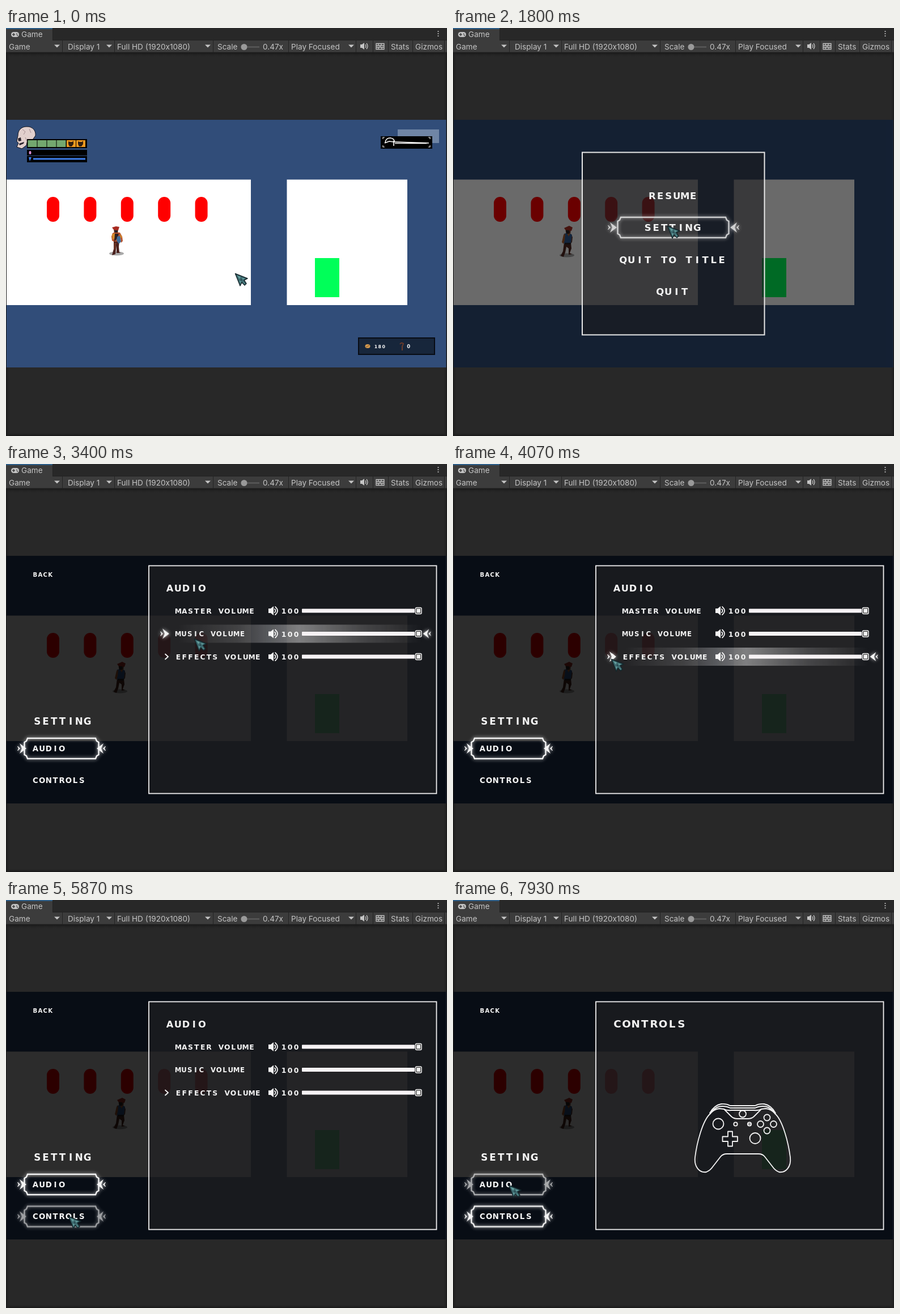
Animation of 778 by 720 pixels, one loop 8 s. Source, as an HTML page:

```html
<!DOCTYPE html>
<html lang="en">
<head>
<meta charset="utf-8">
<title>Game pause menu</title>
<style>
html, body { margin: 0; width: 100%; height: 100%; overflow: hidden; background: #282828; }
svg { display: block; width: 778px; height: 720px; }
.ui { font: 13.6px Inter, sans-serif; fill: #c4c4c4; }
.px { font-family: "DejaVu Sans", sans-serif; font-weight: bold; fill: #f4f4f4; text-anchor: middle; }
.line { fill: none; stroke: #f4f4f4; stroke-width: 1.8; stroke-linejoin: round; stroke-linecap: round; }
.glow { filter: drop-shadow(0 0 3px #fffc); }
.frame { fill: none; stroke: #f4f4f4; stroke-width: 2.4; }
.anim { animation: 8s linear infinite; }

#cursor { animation-name: cursor; }
#hud { animation-name: hud; }
#dim { animation-name: dim; }
#menu { animation-name: menu; }
#settings { animation-name: settings; }
#menuHover { animation-name: menuHover; }
#audioTab { animation-name: audioTab; }
#controlsTab { animation-name: controlsTab; }
#audioPanel { animation-name: audioPanel; }
#controlsPanel { animation-name: controlsPanel; }
#musicHover { animation-name: musicHover; }
#effectsHover { animation-name: effectsHover; }
#idle { animation-name: idle; }
#walk { animation-name: walk; }

@keyframes cursor {
  0%, .9% { transform: translate(404px, 433px); }
  10.9% { transform: translate(384px, 344px); }
  18.4%, 25% { transform: translate(378px, 349px); }
  28.7% { transform: translate(150px, 470px); }
  30.8%, 31.5% { transform: translate(122px, 502px); }
  32.7% { transform: translate(112px, 545px); }
  34.2% { transform: translate(150px, 550px); }
  35.9%, 36.3% { transform: translate(240px, 516px); }
  39.1% { transform: translate(330px, 400px); }
  41.6% { transform: translate(350px, 300px); }
  44.1% { transform: translate(300px, 322px); }
  46.6%, 47.5% { transform: translate(272px, 340px); }
  50%, 51.7% { transform: translate(279px, 344px); }
  53.8% { transform: translate(290px, 338px); }
  55.9%, 58.1% { transform: translate(275px, 342px); }
  60%, 64% { transform: translate(711px, 527px); }
  64.1%, 64.9% { transform: translate(285px, 344px); }
  65%, 67.3% { transform: translate(281px, 346px); }
  71.2% { transform: translate(150px, 520px); }
  73.1%, 75.4% { transform: translate(110px, 558px); }
  77.5% { transform: translate(267px, 536px); }
  79.1% { transform: translate(480px, 500px); }
  80.9% { transform: translate(715px, 400px); }
  82.5% { transform: translate(560px, 256px); }
  84.1%, 88.3% { transform: translate(380px, 336px); }
  90%, 92.3% { transform: translate(370px, 355px); }
  95% { transform: translate(210px, 440px); }
  97.5% { transform: translate(110px, 497px); }
  99.1%, 100% { transform: translate(98px, 503px); }
}
@keyframes hud { 0%, 11.5% { opacity: 1; } 14%, 100% { opacity: 0; } }
@keyframes dim { 0%, 11.5% { opacity: 0; } 15%, 22.9% { opacity: .583; } 24.1%, 100% { opacity: .826; } }
@keyframes menu { 0%, 11.5% { opacity: 0; } 15%, 22.9% { opacity: 1; } 24%, 100% { opacity: 0; } }
@keyframes settings { 0%, 22.9% { opacity: 0; } 24.1%, 100% { opacity: 1; } }
@keyframes menuHover { 0%, 16.5% { opacity: 0; } 18.4%, 100% { opacity: .82; } }
@keyframes audioTab { 0%, 73.7% { opacity: 1; } 73.8%, 97.4% { opacity: 0; } 99.1%, 100% { opacity: .68; } }
@keyframes controlsTab {
  0%, 32% { opacity: 0; } 33%, 34.5% { opacity: .65; } 35.9%, 72.3% { opacity: 0; }
  73.4% { opacity: .65; } 73.8%, 100% { opacity: 1; }
}
@keyframes audioPanel { 0%, 73.7% { opacity: 1; } 73.8%, 100% { opacity: 0; } }
@keyframes controlsPanel { 0%, 73.7% { opacity: 0; } 73.8%, 100% { opacity: 1; } }
@keyframes musicHover { 0%, 40.5% { opacity: 0; } 41.3%, 42.8% { opacity: 1; } 43.9%, 100% { opacity: 0; } }
@keyframes effectsHover {
  0%, 24.1% { opacity: 0; } 25%, 25.9% { opacity: 1; } 27.5%, 43.4% { opacity: 0; }
  44.5%, 67.3% { opacity: 1; } 68.6%, 100% { opacity: 0; }
}
@keyframes idle { 0%, 5% { opacity: 1; } 5.01%, 100% { opacity: 0; } }
@keyframes walk {
  0%, 5% { opacity: 0; transform: translateX(-5px); }
  5.01% { opacity: 1; transform: translateX(-5px); }
  10.9%, 100% { opacity: 1; transform: none; }
}
</style>
</head>
<body>
<svg viewBox="0 0 778 720">
  <defs>
    <linearGradient id="sheen">
      <stop offset="0" stop-color="#fff" stop-opacity="0"/>
      <stop offset=".25" stop-color="#fff" stop-opacity=".14"/>
      <stop offset=".5" stop-color="#fff" stop-opacity=".42"/>
      <stop offset=".75" stop-color="#fff" stop-opacity=".16"/>
      <stop offset="1" stop-color="#fff" stop-opacity="0"/>
    </linearGradient>
    <linearGradient id="shadeY" x2="0" y2="1">
      <stop offset="0" stop-color="#171717"/>
      <stop offset="1" stop-color="#282828" stop-opacity="0"/>
    </linearGradient>
    <linearGradient id="shadeX">
      <stop offset="0" stop-color="#1b1b1b"/>
      <stop offset="1" stop-color="#282828" stop-opacity="0"/>
    </linearGradient>
    <path id="dart" fill="#f4f4f4" d="M3-9 15 0 3 9 7 0ZM-1-4 0-4 4 0 0 4-1 4 1 0Z"/>
    <path id="caret" fill="#c4c4c4" d="M-5-2.5H5L0 2.5Z"/>
    <g id="tab" class="glow">
      <path class="frame" d="M38 484H158L160 489 163.500 491V513L160 515 158 520H38L36 515 32.500 513V491L36 489Z"/>
      <use href="#dart" x="21" y="502"/>
      <use href="#dart" transform="translate(175 502) scale(-1 1)"/>
    </g>
    <g id="rowHover">
      <rect x="300" y="-16" width="435" height="32" fill="url(#sheen)"/>
      <g class="glow">
        <use href="#dart" x="273"/>
        <use href="#dart" transform="translate(749 0) scale(-.9 .9)"/>
      </g>
    </g>
    <g id="speaker">
      <path fill="#f4f4f4" d="M463-4H467L472-8V8L467 4H463Z"/>
      <path class="line" d="M474-3Q477 0 474 3M475-7Q483 0 475 7"/>
    </g>
    <g id="slider">
      <use href="#speaker"/>
      <rect x="522" y="-3.500" width="199" height="7" rx="1" fill="#f6f2f4"/>
      <rect x="722.500" y="-5.500" width="10.500" height="11" rx="2" fill="#303030" stroke="#f4f4f4" stroke-width="1.500"/>
      <rect x="724.500" y="-3.500" width="6.500" height="7" fill="#f4f4f4"/>
    </g>
    <g id="halfPad" class="line">
      <path d="M-57 17C-71 29-81 70-84 94-86 111-76 122-64 120Q-57 117-53 111L-39 93Q-35 88-28 88H0"/>
      <path d="M-57 17Q-51 9-41 8L-33 9-20 22Q-16 26-9 26H0M-33 9Q-28 12-20 11H0"/>
      <path d="M-58 16Q-50 2-38 0-29-1-22 3H0M-54 13Q-47 4-36 4-28 4-22 7H0"/>
    </g>
  </defs>

  <rect width="778" height="720" fill="#282828"/>
  <g id="viewShade">
    <rect y="43" width="778" height="9" fill="url(#shadeY)"/>
    <rect width="778" height="7" fill="url(#shadeY)" transform="matrix(1 0 0 -1 0 720)"/>
    <rect y="43" width="7" height="677" fill="url(#shadeX)"/>
    <rect width="7" height="677" fill="url(#shadeX)" transform="matrix(-1 0 0 1 778 43)"/>
  </g>

  <g id="toolbar" class="ui">
    <path fill="#3c3c3c" d="M0 1H82V22H778V43H0Z"/>
    <path fill="#2c5d87" d="M0 0H82V2H0Z"/>
    <path stroke="#232323" d="M82.500 2V22M82 21.500H778M0 43H778M99.500 22V43M191.500 22V43M365.500 22V43M498.500 22V43M617.500 22V43M647.500 22V43M674.500 22V43M717.500 22V43M773.500 22V43"/>
    <rect x="9" y="7" width="14" height="9" rx="4.500"/>
    <path stroke="#3c3c3c" stroke-width="1.500" d="M11 11.500H16M13.500 9V14M18 10.500H20M19 13H21"/>
    <path stroke="#c4c4c4" stroke-width="2.200" stroke-linecap="round" stroke-dasharray="0 4" d="M762.500 6V15"/>
    <text x="27" y="16">Game</text>
    <text x="5" y="37.500">Game</text>
    <text x="109" y="37.500">Display 1</text>
    <text x="196" y="37.500">Full HD (1920x1080)</text>
    <text x="373" y="38">Scale</text>
    <text x="453" y="38">0.47x</text>
    <text x="503" y="37.500">Play Focused</text>
    <text x="679" y="37.500">Stats</text>
    <text x="722" y="37.500">Gizmos</text>
    <use href="#caret" x="90" y="32"/><use href="#caret" x="182" y="32"/>
    <use href="#caret" x="356" y="32"/><use href="#caret" x="609" y="32"/>
    <path stroke="#5e5e5e" stroke-width="2" d="M420 33.500H447"/>
    <circle cx="420" cy="33.500" r="5.500" fill="#999"/>
    <path d="M625 29H628L632 26V38L628 35H625Z"/>
    <path fill="none" stroke="#c4c4c4" stroke-width="1.300" d="M634 29Q636 32 634 35M636 27Q640 32 636 37M653 27.500H667V37.500H653ZM653 31H667M653 34H667M657 28V31M662 28V31M660 31V34M657 34V37M663 34V37"/>
  </g>

  <g id="scene">
    <rect x="1" y="162" width="775.500" height="437" fill="#314d79"/>
    <path fill="#fff" d="M1 267.500H432V489H1ZM495.500 267.500H708V489H495.500Z"/>
    <path fill="#00ff59" d="M545 406H588V475H545Z"/>
    <g id="pills" fill="red"></g>

    <g id="idle" class="anim">
      <ellipse cx="195" cy="398" rx="13" ry="3.500" fill="#aaa"/>
      <path fill="#4a211d" d="M190 377H200L199 386 200 396 203 397H195L195 384 193 399 187 401 190 390Z"/>
      <path fill="#6d3425" d="M191 379H195L192 392 190 391ZM190 355H198L197 363H191Z"/>
      <path fill="#b5502a" d="M188 362 193 360 201 361 205 368 206 376 203 379 202 370 200 377H190L187 375 186 368Z"/>
      <path fill="#d58b2b" d="M187 364 192 362 194 369 188 374ZM201 363 205 369 202 371Z"/>
      <path fill="#2c2022" d="M192 363H199L197 370 191 377ZM191 357H197V361H192Z"/>
      <path fill="#3e6b98" d="M196 368 201 367 203 377 199 381 195 375Z"/>
      <path fill="#a82a20" d="M187 352 194 350 200 351 198 357 190 356Z"/>
    </g>
    <g id="walk" class="anim">
      <ellipse cx="201" cy="401" rx="13" ry="3.500" fill="#aaa"/>
      <path fill="#50261f" d="M196 379H208L209 389 206 397 210 399 204 400 204 389 200 386 198 396 195 404 190 402 194 394Z"/>
      <path fill="#6b3826" d="M198 354H208L207 364H200ZM208 363 211 369 210 378 207 381Z"/>
      <path fill="#2f5990" d="M196 363 204 361 210 365 208 381 196 381 194 372Z"/>
      <path fill="#ad5f2c" d="M195 365 198 363 197 374 195 381 192 378ZM201 362H207L204 368Z"/>
      <path fill="#292225" d="M199 357H205V363H200ZM197 379H208V382H197Z"/>
      <path fill="#a62e22" d="M196 353 205 349 211 352 209 358 198 356Z"/>
    </g>
  </g>

  <g id="hud" class="anim">
    <path fill="#e2d0cd" stroke="#15151c" d="M21 190C21 179 28 174 37 174 47 174 53 181 52 190L47 197 38 198 36 207 28 213 19 210 22 203 19 200Z"/>
    <path fill="#28222a" d="M21 195 26 193 27 199 22 200ZM23 204 32 201 31 204 24 207Z"/>
    <path fill="none" stroke="#a58f92" d="M29 179 34 183 31 188M41 178 44 185M34 193 38 202"/>
    <path d="M37 196H143V212H37ZM37 215H143V225H37ZM37 226H143V237H37Z"/>
    <path stroke="#73a86f" stroke-width="12" stroke-dasharray="16 1" d="M38.500 204H106"/>
    <path stroke="#f39a1f" stroke-width="12" stroke-dasharray="16 1" d="M107 204H141"/>
    <path id="faces" fill="#332011" d="M110 200 113 201 117 201 119 199V205L116 209H112L110 205ZM127 200 130 201 134 201 136 199V205L133 209H129L127 205Z"/>
    <ellipse cx="42.500" cy="220" rx="2" ry="3" fill="#d88bd2"/>
    <path fill="#3f80ee" d="M40 228H45L42 235ZM48 229.500H140V232.500H48Z"/>
    <rect x="691" y="179" width="73" height="24" fill="#6f85a5"/>
    <rect x="661" y="191" width="91" height="22"/>
    <path fill="none" stroke="#eee" stroke-width="1.200" d="M665 196V193H668M665 207V210H668M748 196V193H745M748 207V210H745"/>
    <path fill="none" stroke="#fff" stroke-width="1.600" d="M669 202Q670 194 678 194 686 195 685 202M668 203 676 200 684 201M684 199V208M686 201 746 203M686 203.500H742"/>
    <rect x="622" y="547" width="134" height="29" fill="#17263b" stroke="#080c14" stroke-width="2"/>
    <ellipse cx="638" cy="561.500" rx="4.500" ry="3.500" fill="#d49a50"/>
    <path stroke="#7c512a" d="M635 563 641 560"/>
    <path fill="none" stroke="#6b3c2b" stroke-width="2" d="M695 558Q698 554 701 557L699 562V569"/>
    <text class="px" x="649" y="565" data-step="6.900">180</text>
    <text class="px" x="706.500" y="565" data-step="7.500">0</text>
  </g>

  <rect id="dim" class="anim" x="1" y="162" width="775.500" height="437"/>

  <g id="menu" class="anim">
    <rect x="228" y="219.500" width="321.500" height="322" fill="#1c1c20" fill-opacity=".61" stroke="#e8e8e8" stroke-width="2"/>
    <g id="menuHover" class="anim"><g class="glow">
      <path class="frame" d="M296 334H481L483 339 486.500 341V363L483 365 481 370H296L294 365 290.500 363V341L294 339Z"/>
      <use href="#dart" x="274" y="352"/>
      <use href="#dart" transform="translate(504 352) scale(-1 1)"/>
    </g></g>
    <text class="px" x="344" y="302" data-step="14.500">RESUME</text>
    <text class="px" x="336.500" y="358" data-step="14.500">SETTING</text>
    <text class="px" x="293" y="415" data-step="14.500">QUIT TO TITLE</text>
    <text class="px" x="358" y="471" data-step="14.500">QUIT</text>
  </g>

  <g id="settings" class="anim">
    <rect x="252" y="179.500" width="507.500" height="402" fill="#212124" fill-opacity=".67" stroke="#f0eff0" stroke-width="1.800"/>
    <text class="px" x="47" y="198.500" data-step="8.900">BACK</text>
    <text class="px" x="48" y="459.500" data-step="14.700">SETTING</text>
    <use id="audioTab" class="anim" href="#tab"/>
    <use id="controlsTab" class="anim" href="#tab" y="56.500"/>
    <text class="px" x="46" y="506.500" data-step="11.700">AUDIO</text>
    <text class="px" x="46" y="563" data-step="11.700">CONTROLS</text>

    <g id="audioPanel" class="anim">
      <use id="musicHover" class="anim" href="#rowHover" y="299.500"/>
      <use id="effectsHover" class="anim" href="#rowHover" y="340"/>
      <path class="line" d="M281 335.500 286 340 281 344.500"/>
      <text class="px" x="282" y="224.500" data-step="14.200">AUDIO</text>
      <text class="px" x="298.500" y="263.500" data-step="10.800">MASTER VOLUME</text>
      <text class="px" x="298.500" y="304" data-step="10.300">MUSIC VOLUME</text>
      <text class="px" x="298.500" y="344.500" data-step="10.800">EFFECTS VOLUME</text>
      <g id="levels"></g>
    </g>

    <g id="controlsPanel" class="anim">
      <text class="px" x="282" y="224.500" data-step="16.100">CONTROLS</text>
      <g transform="translate(511 360)">
        <use href="#halfPad"/>
        <use href="#halfPad" transform="scale(-1 1)"/>
        <g class="line">
          <circle cx="-43" cy="35" r="9.500"/><circle cx="22" cy="60.500" r="9.500"/>
          <circle cy="17.500" r="6"/>
          <circle cx="43" cy="24" r="5.500"/><circle cx="43" cy="47" r="5.500"/>
          <circle cx="31.500" cy="35.500" r="5.500"/><circle cx="54.500" cy="35.500" r="5.500"/>
          <circle cx="-12.500" cy="35.500" r="3.200"/><circle cx="12" cy="35.500" r="3.200"/>
          <path d="M10 34.500H14M10 36.500H14" stroke-width="1"/>
          <path d="M-26 48.500H-18V57.500H-9V66H-18V74.500H-26V66H-35.500V57.500H-26Z"/>
        </g>
      </g>
    </g>
  </g>

  <g id="cursor" class="anim">
    <path fill="#3d696e" stroke="#14262b" stroke-width="1.400" stroke-linejoin="round" d="M.5.5 22 9 16 12 20 18 17 21 12 16 9 22Z"/>
    <path fill="#65a09f" d="M4 4 10 6 8 10ZM12 8 18 9 14 11ZM8 13 11 14 9 18ZM14 14 17 18 16 19Z"/>
    <path fill="#284a51" d="M10 9 13 12 10 13Z"/>
  </g>
</svg>
<script>
const svgNode = (tag, parent, attrs, text = '') => {
  const node = document.createElementNS('http://www.w3.org/2000/svg', tag);
  for (const key in attrs) node.setAttribute(key, attrs[key]);
  node.textContent = text;
  parent.append(node);
};
const byId = id => document.getElementById(id);

for (let i = 0; i < 5; i++) {
  svgNode('rect', byId('pills'), { x: 72 + i * 65.4, y: 298, width: 22, height: 44, rx: 11 });
}
for (let i = 0; i < 3; i++) {
  const y = 259 + i * 40.5;
  svgNode('use', byId('levels'), { href: '#slider', y });
  svgNode('text', byId('levels'), { class: 'px', x: 484.5, y: y + 5, 'data-step': 11 }, '100');
}

// Lay the wide capitals out on an even, monospaced pitch.
for (const label of document.querySelectorAll('.px')) {
  const step = +label.dataset.step, left = +label.getAttribute('x');
  label.style.fontSize = step * 1.14 + 'px';
  label.setAttribute('x', [...label.textContent].map((_, i) => left + step * (i + .5)).join(' '));
}
</script>
</body>
</html>
```
